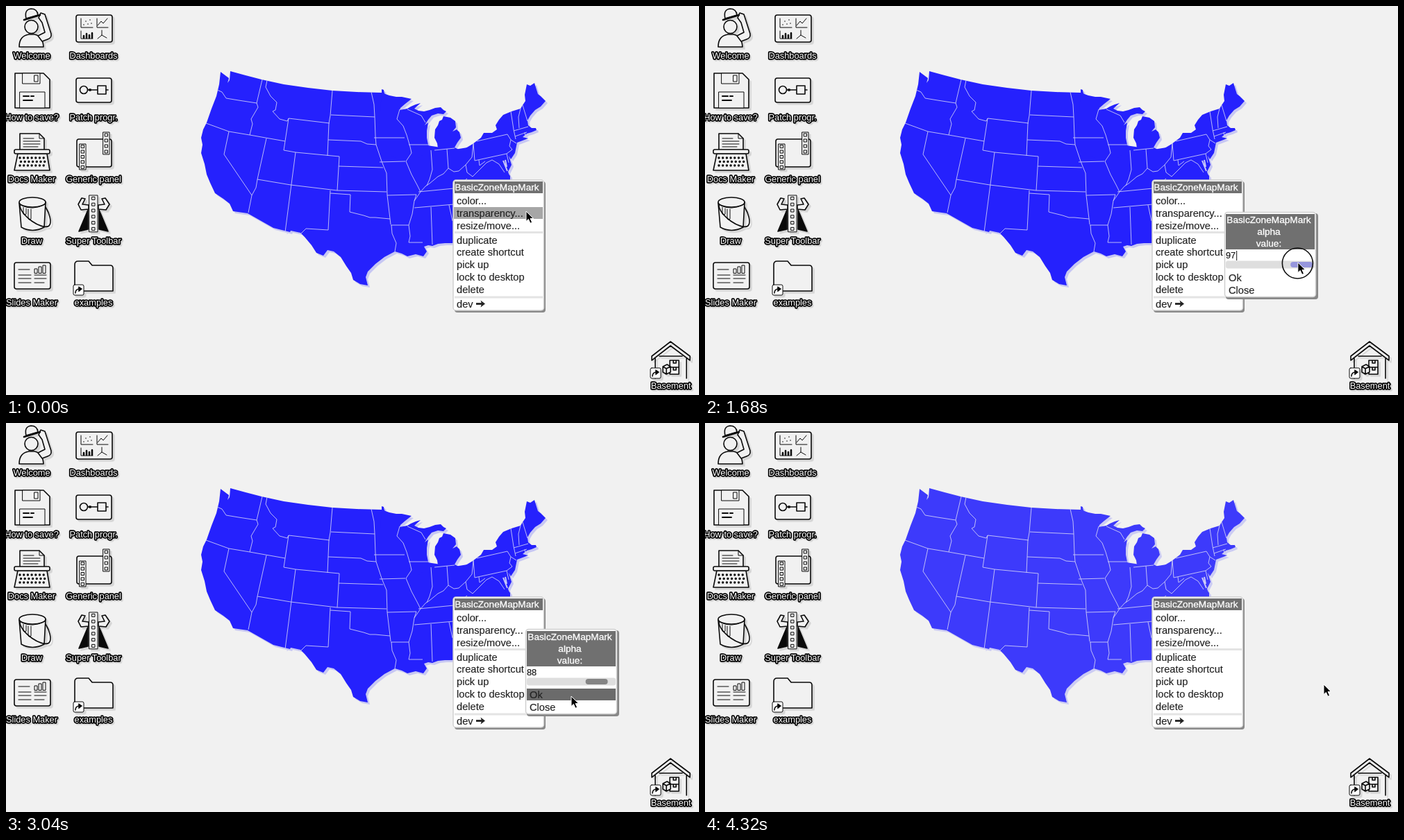
An HTML page that plays this animation: 998 by 561 pixels, repeating every 4400 ms.

```html
<!DOCTYPE html>
<html lang="en">
<head>
<meta charset="utf-8">
<title>Map transparency</title>
<style>
html, body { margin: 0; width: 100%; height: 100%; overflow: hidden; background: #f1f1f1; }
svg { display: block; width: 100vw; height: 100vh; font-family: "Liberation Sans", Arial, sans-serif; }
.icons { fill: #f1f1f1; stroke: #0a0a0a; stroke-width: 1.6; stroke-linejoin: round; stroke-linecap: round; filter: drop-shadow(3px 3px 0 #d6d6d6); }
.icons .thin { stroke-width: 1; }
.icons .solid { fill: #0a0a0a; }
.icons .open { fill: none; }
.labels { font-size: 12.8px; text-anchor: middle; fill: #fff; stroke: #000; stroke-width: 3.4; stroke-linejoin: round; paint-order: stroke; filter: drop-shadow(2px 2px 0 #d6d6d6); }
.land { fill: #2521fd; }
.borders { fill: none; stroke: #c9c9f8; stroke-width: .9; stroke-linejoin: round; }
.item { font-size: 14.65px; fill: #222; stroke: #222; stroke-width: .15; }
.title { font-size: 13.65px; fill: #fff; stroke: #fff; stroke-width: .3; text-anchor: middle; }
.field { font-size: 12.8px; fill: #111; stroke: #111; stroke-width: .15; }
</style>
</head>
<body>
<svg viewBox="0 0 998 561" preserveAspectRatio="none">
  <rect width="998" height="561" fill="#f1f1f1"/>
  <g id="map" style="filter:drop-shadow(3px 3px 0 rgba(34,34,255,.2))">
    <g class="land">
      <path d="M309 95L317 101 321 104 319 111 322 107 323 94 345 100 368 106 400 113 435 118 470 122 505 124 541 125 541 120 544 121 545 126 600 200 646 207 690 200 726 245 726 290 643 342 632 342 622 343 614 346 608 345 602 347 606 354 601 361 590 358 578 361 570 357 560 354 545 362 532 372 521 383 518 391 521 403 510 401 500 395 497 385 490 375 482 362 472 354 463 352 457 360 447 356 440 345 430 333 424 327 410 324 409 326 385 320 348 299 327 296 322 285 313 278 301 270 294 255 289 243 286 228 281 212 283 200 281 190 284 178 289 168 296 148 303 130 307 113Z"/>
      <path d="M541 125L552 129 562 131 570 131 584 134 575 141 568 147 567 150 578 148 583 145 590 142 597 140 588 148 594 151 602 152 610 150 618 147 626 146 630 150 634 152 630 156 622 155 613 158 608 164 603 172 608 168 606 180 606 190 608 200 611 207 580 230 535 205Z"/>
      <path d="M600 207L611 207 617 209 622 205 621 198 617 190 618 178 622 172 624 166 628 164 630 159 640 161 647 166 648 175 643 181 649 178 653 182 655 190 650 197 646 204 652 207 662 205 672 199 684 190 688 183 700 183 707 178 705 172 710 164 716 157 728 152 741 148 744 143 748 137 747 128 750 113 755 115 761 111 766 127 770 130 777 137 770 145 762 150 755 158 751 165 752 172 757 176 763 176 764 179 757 182 750 184 744 189 752 191 736 197 735 202 733 212 727 221 724 216 728 229 723 239 726 248 726 300 600 300Z"/>
    </g>
    <g class="borders">
      <path d="M304 121L311 124 317 133 335 136 361 140M369 106L361 140 363 146 353 163 355 170 351 186M288 169L321 181 351 186 402 195M376 107L374 117 381 130 390 139 388 150 384 152 394 163 405 166 407 162M407 162L400 208 417 211 480 217M407 162L466 169M470 122L467 158 465 169 463 216M321 181L314 214 354 273 349 298M375 191L362 250 360 262 354 273M362 250L410 258 477 266M417 211L402 326M480 217L477 266M467 266L464 323 432 321 425 328"/>
      <path d="M468 157L531 160M464 193L511 195 520 199 533 200M526 124L530 142 531 160 532 188 533 200 541 224 545 234 548 241 549 273 554 315M530 190L574 190M479 231L543 233M477 266L548 268M538 225L575 224M567 149L563 163 572 173 577 186 582 203 584 212 576 224 584 243 592 258 597 268 588 281 585 300 580 316 582 332 580 341 600 341M580 200L608 200M578 149L598 158 604 168M612 208L614 236 610 250 606 259M549 273L591 272 588 281M554 316L580 316M555 316L556 328 562 342 560 354M467 270L496 272 495 297 503 299 515 302 524 305 532 305 542 306 553 307"/>
      <path d="M594 268L645 263M588 291L645 286M612 290L614 344M638 287L643 310M597 268L604 260 610 256 622 246 630 242 637 234 645 239 652 238 662 229 671 218 673 198M635 206L637 234M617 208L646 205M673 198L675 223 721 213M678 195L722 185 727 193 725 202 729 207 721 213 724 226M727 193L735 198M662 229L664 240 672 246 684 234 692 226 700 222 710 228 718 240M681 222L682 230 690 224M645 263L664 249M727 152L731 178 734 192M741 148L738 160 739 176M744 143L751 166M731 180L752 174M733 188L750 182M747 182L748 188"/>
      <path d="M716 223L722 238M719 222L721 232" stroke-width="2"/>
    </g>
  </g>
  <g class="icons">
    <g>
      <path d="M19 59Q19 43 33 41H41Q53 43 54 59Z"/>
      <path d="M47 17L50 10 56 12 65 40Q66 46 60 48L52 51 46 43 56 38 52 24Z"/>
      <circle cx="36.500" cy="30" r="9.500"/>
      <path d="M29 18Q26 5 36 4 45 4 46 13Z"/><path d="M26 20L49 13" stroke-width="2.600"/>
    </g>
    <g>
      <rect x="101" y="13" width="52" height="39" rx="3"/>
      <path class="open thin" d="M108 18V31H125M131 18V31H147M132 28L137 22 140 25 146 18M108 36V47H125M138 35V42L132 47M138 42L145 46"/>
      <path class="open" d="M112 46V43M116 46V40M120 46V42M124 46V39" stroke-width="2.500"/>
      <path class="open" d="M112 27h0M115 22h0M118 26h0M121 20h0M123 25h0"/>
    </g>
    <g>
      <path d="M13 97H54L63 106V147H13Z"/><path class="thin" d="M24 97H49V112H24ZM41 100H46V109H41ZM20 124H56V147H20Z"/>
      <path class="open" d="M25 130H33M36 130H40M25 136H38" stroke-width="2"/>
    </g>
    <g>
      <rect x="101" y="104" width="51" height="35" rx="3"/><circle cx="112" cy="121" r="5.500"/>
      <path d="M118 121H132M132 115H144V127H132Z"/><path class="solid" d="M120 120H122V122H120Z"/>
      <path class="open" d="M144 121H147"/>
    </g>
    <g>
      <path d="M20 210V184H48L55 191V210Z"/><path class="open thin" d="M48 184V191H55M25 191H40M25 195H49M25 199H49M25 203H46"/>
      <path d="M17 213H59L63 237H12Z"/><rect x="12" y="207" width="51" height="6" rx="2"/>
      <path class="open" id="keys" stroke-width="3.400"/>
    </g>
    <g><rect x="102" y="192" width="50" height="40" rx="3"/><g id="panels"></g></g>
    <g>
      <path d="M19 284L22 319Q38 328 55 319L57 283"/><ellipse cx="38" cy="283" rx="19" ry="7"/>
      <path class="open thin" d="M21 287Q38 296 56 286M25 290V300Q27 303 29 300V292M32 293V307Q34 310 36 307V293"/>
      <path class="open" d="M20 287C20 302 52 324 62 317 67 312 62 298 57 290"/>
    </g>
    <g>
      <path class="solid" d="M118 294L105 325 118 322ZM134 294L147 325 134 322Z"/>
      <path d="M119 293L108 294 104 286 109 277 114 278 112 282 110 286 119 287ZM133 293L144 294 149 286 143 277 138 278 140 282 142 286 133 287Z"/>
      <g id="strip"></g>
    </g>
    <g>
      <rect x="12" y="370" width="52" height="38" rx="3"/>
      <path class="open thin" d="M18 380H34M18 388H36M41 388H58M18 393H36M41 393H58M18 399H36M41 399H55"/>
      <path class="thin" d="M41 385V379H45V385ZM47 385V376H51V385ZM53 385V374H57V385Z"/>
    </g>
    <path d="M99 411V373Q99 368 104 368H119L124 374H150Q154 374 154 378V411Z"/>
    <g>
      <path class="open" d="M930 511V505L957 484 985 505V511L957 490ZM935 508V537M980 508V537M941 505H974"/>
      <path d="M956 511H969V531H956ZM956 521H969M961 511V515H965V511M961 521V525H965V521"/>
      <path d="M946 520L952 517 957 520V528L951 531 946 528ZM946 520L951 523 957 520M951 523V531"/>
    </g>
    <g id="shortcuts"></g>
  </g>
  <g class="labels" id="labels"></g>

  <g>
    <rect x="646" y="253" width="131" height="189" rx="4" fill="#888"/>
    <rect x="644" y="251" width="130.500" height="188" rx="4" fill="#fff" stroke="#cfcfcf" stroke-width="1.500"/>
    <rect x="646" y="253" width="127" height="17" fill="#707070"/>
    <text class="title" x="707" y="266">BasicZoneMapMark</text>
    <rect id="menuHover" x="645" y="290" width="128" height="17" fill="#6b6b6b"/>
    <path d="M646 326.500H773M646 420H773" stroke="#e4e4e4" stroke-width="3"/>
    <g class="item" id="menuItems"></g>
    <path d="M677 429.500H686" stroke="#222" stroke-width="2.800"/><path d="M683.500 424.500L690 429.500 683.500 434.500 685 429.500Z" fill="#222"/>
  </g>

  <g id="popup">
    <rect x="750" y="299" width="133" height="124" rx="4" fill="#888"/>
    <rect x="748.500" y="297.500" width="131" height="122" rx="4" fill="#fff" stroke="#cfcfcf" stroke-width="1.500"/>
    <rect x="750" y="300" width="128" height="51" fill="#707070"/>
    <g class="title"><text x="812" y="313">BasicZoneMapMark</text><text x="812" y="330">alpha</text><text x="812" y="346.500">value:</text></g>
    <text class="field" id="value" x="750" y="364"></text>
    <path id="caret" stroke="#111" stroke-width="1"/>
    <rect x="750" y="367.500" width="128" height="11" rx="3" fill="#dedede"/>
    <rect id="thumb" y="369" width="32" height="8" rx="4"/>
    <rect id="okHover" x="750" y="383" width="128" height="17" fill="#6b6b6b"/>
    <g class="item"><text x="754" y="397">Ok</text><text x="754" y="415">Close</text></g>
  </g>

  <circle id="ring" r="22" fill="none" stroke="#111" stroke-width="1.600"/>
  <path id="pointer" d="M0 0V14.500L3.400 11.400 6 17.300 8.600 16.100 6.100 10.500H10.600Z" fill="#000" stroke="#fff" stroke-width="1"/>
</svg>
<script>
const LOOP = 4400, STEP = 80;
const $ = id => document.getElementById(id);
const show = (id, on) => $(id).setAttribute("visibility", on ? "visible" : "hidden");
const set = (id, attrs) => { for (const k in attrs) $(id).setAttribute(k, attrs[k]); };
const text = (x, y, s) => `<text x="${x}" y="${y}">${s}</text>`;

const desktop = [
  ["Welcome", "Dashboards"], ["How to save?", "Patch progr."], ["Docs Maker", "Generic panel"],
  ["Draw", "Super Toolbar"], ["Slides Maker", "examples"]
];
$("labels").innerHTML = desktop.map((row, r) =>
  row.map((s, c) => text(c ? 126 : 37, 76 + r * 89, s)).join("")).join("") + text(957.5, 551.5, "Basement");

const menu = { "color...": 286, "transparency...": 304, "resize/move...": 321.5, "duplicate": 342.5, "create shortcut": 360,
  "pick up": 378, "lock to desktop": 396, "delete": 413.5, "dev": 434.5 };
$("menuItems").innerHTML = Object.entries(menu).map(([s, y]) => text(649, y, s)).join("");

// A narrow tool strip: a frame holding a column of small buttons.
function toolStrip(x, y, w, cell, n) {
  let out = `<rect class="thin" x="${x}" y="${y}" width="${w}" height="${cell * n}"/>`;
  for (let i = 0; i < n; i++)
    out += `<rect class="thin" x="${x + w / 2 - 2}" y="${y + cell * (i + .5) - 2}" width="4" height="4"/>`;
  return out;
}
$("panels").innerHTML = toolStrip(106, 199, 9, 7.4, 5) + toolStrip(140, 182, 9, 8, 4);
$("strip").innerHTML = toolStrip(120, 273, 12, 8.8, 6);

let keys = "";
for (let r = 0; r < 3; r++)
  for (let i = 0; i < 7; i++) keys += `M${20 + i * 5.7 + (r % 2) * 1.5} ${219 + r * 5.5}h0`;
set("keys", { d: keys });

$("shortcuts").innerHTML = [[97, 402], [928, 522]].map(([x, y]) =>
  `<g transform="translate(${x} ${y})"><rect class="thin" width="15" height="15" rx="2" fill="#fff"/>
   <path class="open" d="M3 12Q3 6 9 6"/><path class="solid thin" d="M8 3L12.500 6 8 9.500Z"/></g>`).join("");

// Piecewise linear track of [time, ...values].
function track(points, t) {
  const i = points.findIndex(p => p[0] > t);
  if (i < 0) return points.at(-1).slice(1);
  if (!i) return points[0].slice(1);
  const a = points[i - 1], b = points[i], k = (t - a[0]) / (b[0] - a[0]);
  return a.slice(1).map((v, j) => v + (b[j + 1] - v) * k);
}
const pointerPath = [
  [0, 749, 296], [240, 749, 297], [480, 783, 323], [800, 834, 352], [1040, 857, 368], [1200, 858, 369],
  [1520, 857, 370], [2080, 846, 370], [2320, 844, 370], [2560, 844, 371], [2880, 815, 393], [3040, 814, 394],
  [3280, 814, 394], [3520, 865, 385], [3680, 884, 380], [4000, 890, 378], [4320, 891, 377]
];
const valuePath = [[1520, 100], [2080, 90], [2320, 88]];
const within = (t, a, b) => t >= a && t < b;

function draw(t) {
  const [x, y] = track(pointerPath, t);
  const value = Math.round(track(valuePath, t)[0]);
  const dragging = within(t, 1440, 2480);
  const overThumb = within(t, 1040, 2640);
  const popup = within(t, 320, 3280);

  set("pointer", { transform: `translate(${x} ${y})` });
  set("ring", { cx: x - .5, cy: y + 1 });
  show("ring", within(t, 160, 320) || dragging || within(t, 3120, 3280));

  set("menuHover", { opacity: within(t, 0, 400) ? track([[0, .6], [160, 1], [320, 1], [400, 0]], t)[0] : 0 });
  set("okHover", { opacity: popup ? track([[2800, 0], [2960, 1]], t)[0] : 0 });

  show("popup", popup);
  $("value").textContent = value;
  const caretX = 751.5 + String(value).length * 7.1;
  set("caret", { d: `M${caretX} 353V367`, opacity: t < 2640 ? 1 : 0 });
  set("thumb", { x: 846 - (100 - value) * .95, fill: dragging ? "#9696dc" : overThumb ? "#8b8bc0" : value < 100 ? "#848484" : "#8e8e8e" });
  set("map", { opacity: t >= 3280 ? value / 100 : 1 });
}

const start = performance.now();
function frame() {
  const t = (performance.now() - start) % LOOP;
  draw(Math.floor(t / STEP) * STEP);
  requestAnimationFrame(frame);
}
frame();
</script>
</body>
</html>
```
